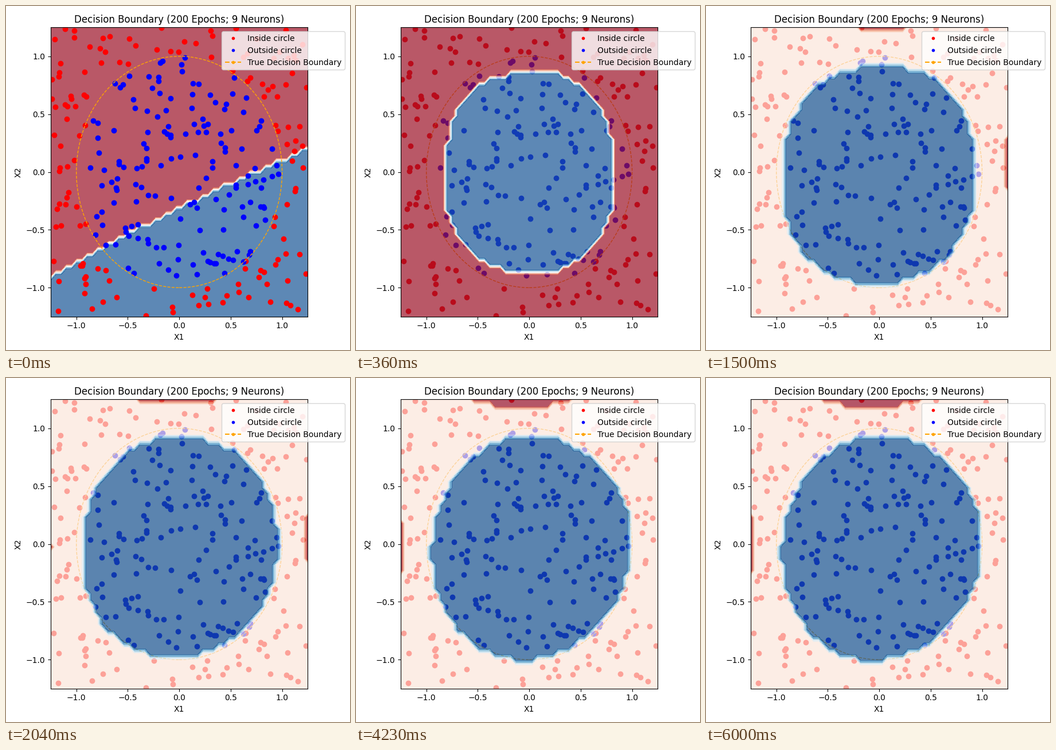
Write a matplotlib script that moves like this. It is 600x600 px and loops after 6030 ms.

```python
import numpy as np
import matplotlib.pyplot as plt
from matplotlib.animation import FuncAnimation

FRAMES, INTERVAL = 201, 30
LIMIT, CELLS, POINTS = 1.25, 50, 300

# Training moves steadily until SLOW, then only in short bursts of frames.
SLOW = 91
BURSTS = [(97, 109), (114, 114), (119, 128), (141, 145), (154, 155),
          (160, 171), (193, 200)]

# Harmonics of the region's radius: mean, cos, sin, cos 2, sin 2, cos 3, cos 4.
KEYS = [12, 42, 91, 142]
SHAPES = np.array([
    [.874, .006, -.006, -.024, 0, 0, -.020],
    [.957, -.006, -.024, 0, .012, 0, -.026],
    [.963, .008, -.030, 0, .022, .012, 0],
    [.968, .012, -.034, 0, .020, .012, 0],
])

axis = np.linspace(-LIMIT, LIMIT, CELLS)
X, Y = np.meshgrid(axis, axis)
R, A = np.hypot(X, Y), np.arctan2(Y, X)
WAVES = [np.ones_like(A), np.cos(A), np.sin(A), np.cos(2 * A), np.sin(2 * A),
         np.cos(3 * A), np.cos(4 * A)]
START = -.31 + .44 * X - .025 * X ** 2 - Y


def clock(f):
    """Training time: frames that have passed without the pauses."""
    return min(f, SLOW) + sum(np.clip(f - a + 1, 0, b - a + 1)
                              for a, b in BURSTS)


def radius(t):
    coefs = [np.interp(t, KEYS, column) for column in SHAPES.T]
    jitter = .008 * max(0, 1 - t / 88) * np.sin(2.3 * t + 5 * A)
    return sum(c * w for c, w in zip(coefs, WAVES)) + jitter


def prediction(f):
    """Rounded network output (-1, 0 or 1) on the grid."""
    t = clock(f)
    grow = min(t / 12, 1) ** .6
    z = np.where((1 - grow) * START + grow * (radius(t) - R) > 0, 1.0, 0.0)
    if t < 38:
        return z

    # Negative patches at the top, right and left edges.
    peak = np.interp(t, [50, 91, 115], [.02, -.09, -.075])
    base = np.interp(t, [38, 85], [1.249, 1.177])
    z[Y > base + .326 * (X - peak) ** 2] = -1
    if t < 78:
        right = .28 * np.sin(np.pi * (t - 38) / 40)
        z[abs(axis - .07) < right, -1] = -1
    left = np.interp(t, [65, 91, 115, 142], [0, .15, .225, .25])
    middle = np.interp(t, [115, 142], [-.04, -.015])
    z[abs(axis - middle) < left, 0] = -1
    return z


fig, ax = plt.subplots(figsize=(6, 6), dpi=100)
ax.set_xlim(-LIMIT, LIMIT)
ax.set_ylim(-LIMIT, LIMIT)
ax.set_xticks(np.arange(-1, 1.1, .5))
ax.set_yticks(np.arange(-1, 1.1, .5))
ax.set_xlabel("X1")
ax.set_ylabel("X2")
ax.set_title("Decision Boundary (200 Epochs; 9 Neurons)")

points = np.random.default_rng(7).uniform(-LIMIT, LIMIT, (POINTS, 2))
inside = np.hypot(*points.T) < 1
ax.scatter(*points[~inside].T, color="red")
ax.scatter(*points[inside].T, color="blue")
ax.add_patch(plt.Circle((0, 0), 1, color="orange", fill=False, linestyle="--"))

ax.plot([], [], ".", color="red", label="Inside circle")
ax.plot([], [], ".", color="blue", label="Outside circle")
ax.plot([], [], ".--", color="orange", label="True Decision Boundary")
ax.legend(loc="upper left", bbox_to_anchor=(.65, 1))
fig.tight_layout()

shown = []


def draw(f):
    while shown:
        shown.pop().remove()
    # The first picture lies under the points, all later ones above them.
    shown.append(ax.contourf(X, Y, prediction(f), cmap="RdBu", alpha=.7,
                             zorder=1.5 if f else .5))
    return shown


anim = FuncAnimation(fig, draw, frames=FRAMES, interval=INTERVAL, repeat=True)
plt.show()
```
